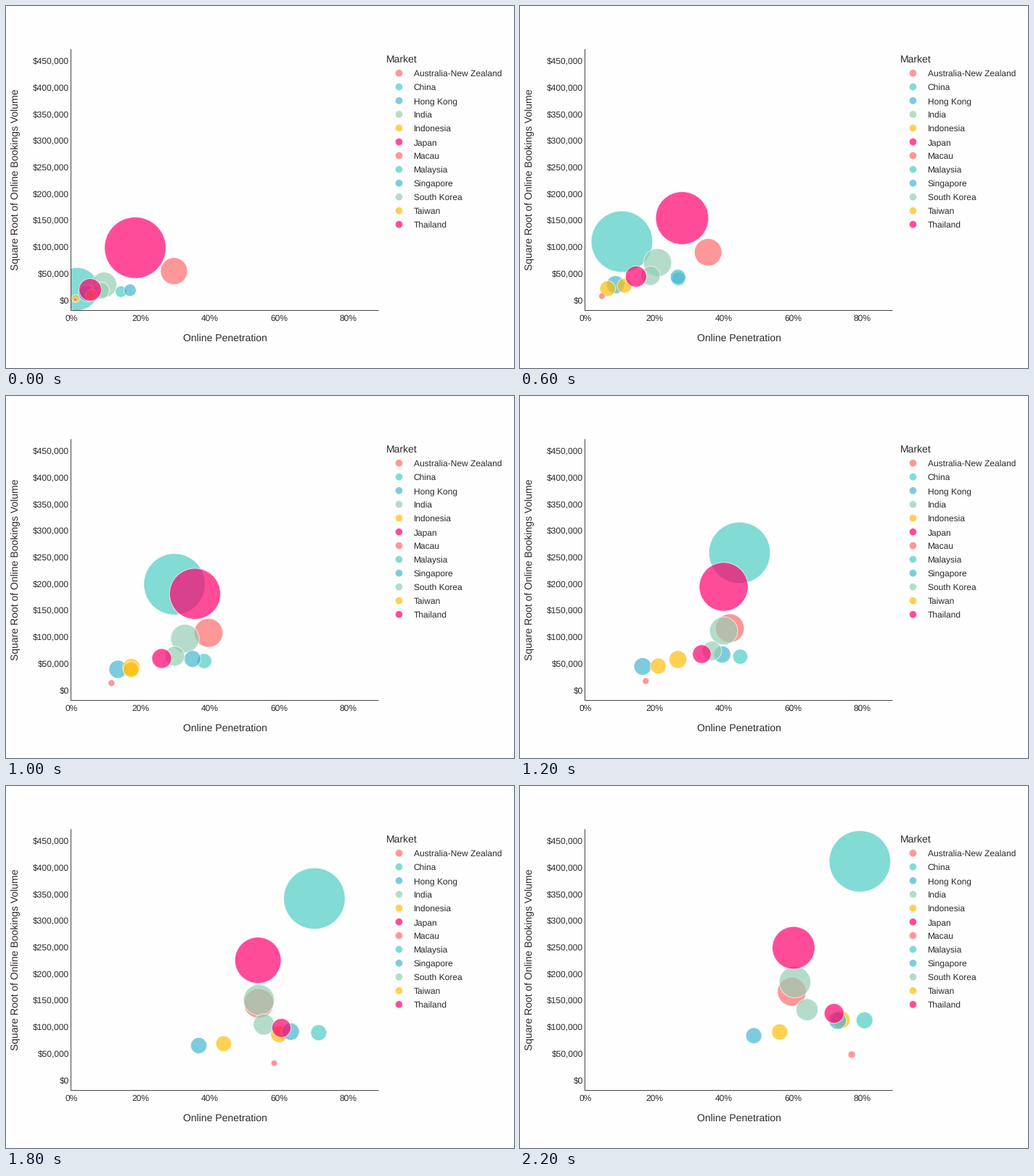
Animation of 700x500 px, one loop 2.3 s. Source, as a matplotlib script:

```python
import numpy as np
import matplotlib.pyplot as plt
from matplotlib.animation import FuncAnimation
from matplotlib.patches import Rectangle

W, H, DPI = 700, 500, 100
FRAMES, STEP_MS = 23, 100
PX = 72 / DPI                      # points per pixel
X0, Y0 = 89.8, 406.5               # stage position of 0 % and $0
X_UNIT, Y_UNIT = 4.77, 0.7333      # pixels per percent and per $1,000
R_MAX, ALPHA = 42.3, 0.7
MID, SLUMP, END = 12, 15, FRAMES - 1
RECOVERY = 3                       # years until the slump is made up
INK = "#2a2a2a"
PALETTE = ["#ff6b6b", "#4ecdc4", "#45b7d1", "#96ceb4", "#ffbe0b", "#ff006e"]

# (percent online, volume in $1,000) at the start, middle and end;
# then the part of the volume that survives the slump
MARKETS = {
    "Australia-New Zealand": ((29.7, 55), (41.8, 117), (59.7, 167), 0.65),
    "China": ((1.72, 21.2), (44.6, 259), (79.35, 412.5), 0.91),
    "Hong Kong": ((4.45, 13), (16.6, 45), (48.7, 84), 0.46),
    "India": ((9.5, 29.3), (40, 112), (60.6, 185), 0.53),
    "Indonesia": ((1.3, 3.4), (26.8, 58), (74, 114), 0.64),
    "Japan": ((18.5, 99), (40, 195), (60.2, 249.5), 0.72),
    "Macau": ((1.2, 1.6), (17.5, 17.5), (77, 48.4), 0.53),
    "Malaysia": ((14.4, 16.4), (44.8, 63.4), (80.7, 113), 0.46),
    "Singapore": ((17, 19), (39.6, 67.5), (72.9, 112.5), 0.48),
    "South Korea": ((8.6, 18.4), (36.6, 74.3), (64.1, 133), 0.66),
    "Taiwan": ((5.8, 10.2), (21.1, 45.7), (56.2, 91), 0.81),
    "Thailand": ((5.5, 19.8), (33.7, 68.2), (71.9, 126), 0.52),
}
COLORS = [PALETTE[i % len(PALETTE)] for i in range(len(MARKETS))]


def legs(year, values, ease_in, ease_out):
    """Go from start to middle to end, each leg with its own power ease."""
    a, b, c = values
    if year <= MID:
        return a + (b - a) * (year / MID) ** ease_in
    return b + (c - b) * ((year - MID) / (END - MID)) ** ease_out


def share_at(year, shares):
    """Adoption follows an S-curve, so it is eased on the logit scale."""
    p = np.array(shares) / 100
    return 100 / (1 + np.exp(-legs(year, np.log(p / (1 - p)), 1, 0.73)))


def volume_at(year, volumes, survives):
    trend = np.exp(legs(year, np.log(volumes), 0.6, 1))
    since = (year - SLUMP) / RECOVERY
    return trend * survives ** (1 - since ** 2) if 0 <= since < 1 else trend


def state(year):
    """Bubble centres and radii; the area stands for the total market."""
    share, volume = [], []
    for *points, survives in MARKETS.values():
        shares, volumes = zip(*points)
        share.append(share_at(year, shares))
        volume.append(volume_at(year, volumes, survives))
    share, volume = np.array(share), np.array(volume)
    weight = volume / np.sqrt(share)
    return (X0 + share * X_UNIT, Y0 - volume * Y_UNIT,
            R_MAX * weight / weight.max())


def sizes(r):
    return (2 * np.asarray(r) * PX) ** 2


plt.rcParams["font.family"] = "Liberation Sans"
plt.rcParams["text.hinting"] = "none"
fig = plt.figure(figsize=(W / DPI, H / DPI), dpi=DPI, facecolor="#fefefe")
ax = fig.add_axes([0, 0, 1, 1])
ax.set(xlim=(0, W), ylim=(H, 0))
ax.axis("off")


def label(x, y, text, px=12, **kw):
    ax.text(x, y, text, fontsize=px * PX, color=INK, va="baseline", **kw)


def bubbles(x, y, r, **kw):
    return ax.scatter(x, y, s=sizes(r), c=COLORS, alpha=ALPHA,
                      edgecolors="white", linewidths=PX, **kw)


for i in range(10):
    y = Y0 - 50 * i * Y_UNIT
    label(87, y + 4.4, f"${50000 * i:,}", ha="right")
    if i:
        ax.plot(X0 + X_UNIT * np.arange(20, 81, 20), [y] * 4, "s",
                color="#f7f7f7", ms=1.5 * PX, mew=0, zorder=0)
for p in range(0, 81, 20):
    label(X0 + p * X_UNIT, 435, f"{p}%", ha="center")
label(301.5, 463, "Online Penetration", 14, ha="center")
label(17.5, 239.8, "Square Root of Online Bookings Volume", 14, ha="center",
      rotation=90, rotation_mode="anchor")

label(523.5, 78, "Market", 14)
rows = 92.7 + 19 * np.arange(len(MARKETS))
for name, y in zip(MARKETS, rows):
    label(561.5, y + 4.4, name)
bubbles([541.5] * len(rows), rows, [5.2] * len(rows))

ax.plot([89.5, 89.5, 513], [60, 420.5, 420.5], color="#444444",
        lw=PX, zorder=1, solid_joinstyle="miter", snap=False)
plot_area = Rectangle((90, 60), 423, 360, transform=ax.transData)
dots = bubbles(*state(0), zorder=3)
dots.set_clip_path(plot_area)


def draw(year):
    x, y, r = state(year)
    dots.set_offsets(np.column_stack([x, y]))
    dots.set_sizes(sizes(r), DPI)
    return [dots]


anim = FuncAnimation(fig, draw, frames=FRAMES, interval=STEP_MS,
                     repeat=True, repeat_delay=0)
plt.show()
```
